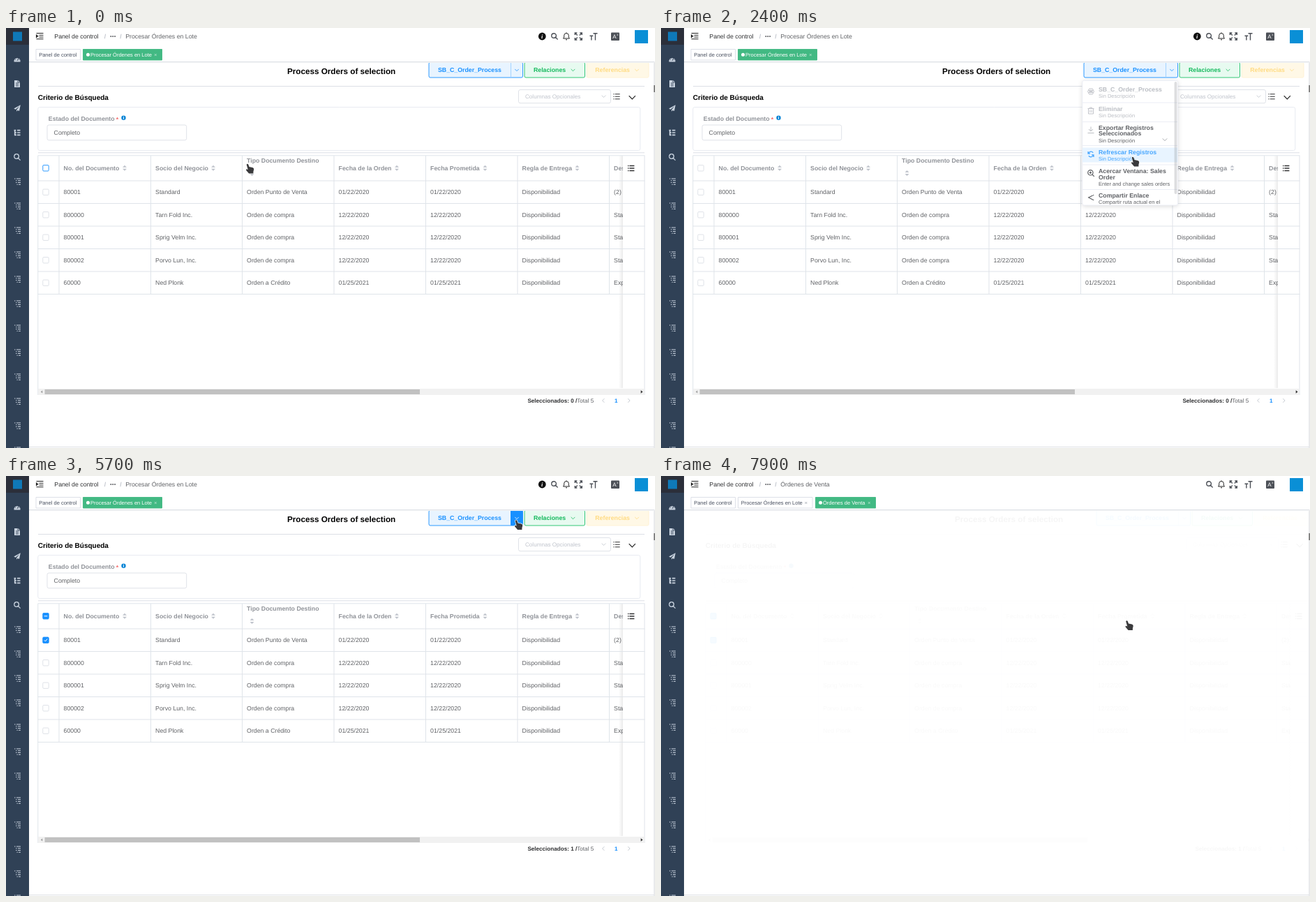
An HTML page with a canvas that plays this animation: 930 by 602 pixels, repeating every 8 s.

```html
<!DOCTYPE html>
<html lang="es">
<head>
<meta charset="utf-8">
<title>Procesar Órdenes en Lote</title>
<style>
html, body { margin: 0; width: 100%; height: 100%; overflow: hidden; background: #fff; }
canvas { display: block; }
</style>
</head>
<body>
<canvas id="stage" width="930" height="602"></canvas>
<script>
const ctx = document.getElementById('stage').getContext('2d');
const LOOP = 8000, STEP = 100;
const BLUE = '#1890ff', TEXT = '#606266', HEAD = '#909399', MUTED = '#c0c4cc', LINE = '#dfe4ea', DARK = '#303133';
const ARROW = 0, HAND = 1;

// time, x, y, pointer shape
const PATH = [
  [0, 343.5, 194.5, HAND], [300, 343.5, 194.5, HAND], [400, 540, 170, ARROW], [500, 711, 147, ARROW],
  [700, 711, 147, ARROW], [1000, 729.5, 55.5, HAND], [2100, 729.5, 55.5, HAND], [2400, 673.5, 184.5, HAND],
  [2800, 673.5, 184.5, HAND], [3100, 540, 184, HAND], [3300, 411.5, 182, HAND], [3400, 411.5, 182, HAND],
  [3600, 132.5, 181.5, HAND], [3700, 132.5, 181.5, HAND], [4000, 48.5, 236, HAND], [4800, 48.5, 236, HAND],
  [4900, 84, 221, ARROW], [5000, 84, 221, ARROW], [5200, 657, 111, ARROW], [5300, 657, 111, ARROW],
  [5500, 728.5, 63, HAND], [6200, 728.5, 63, HAND], [6400, 693, 165.5, ARROW], [6500, 688, 176, HAND],
  [6900, 665, 207, HAND], [LOOP, 665, 207, HAND]
];
const COLS = [76, 207.5, 338.5, 470, 601.5, 733, 864.5];
const ROW_TOP = 219, ROW_H = 32.5;
const ROWS = [
  ['80001', 'Standard', 'Orden Punto de Venta', '01/22/2020', '01/22/2020', 'Disponibilidad', '(2)'],
  ['800000', 'Tarn Fold Inc.', 'Orden de compra', '12/22/2020', '12/22/2020', 'Disponibilidad', 'Standard'],
  ['800001', 'Sprig Velm Inc.', 'Orden de compra', '12/22/2020', '12/22/2020', 'Disponibilidad', 'Standard'],
  ['800002', 'Porvo Lun, Inc.', 'Orden de compra', '12/22/2020', '12/22/2020', 'Disponibilidad', 'Standard'],
  ['60000', 'Ned Plonk', 'Orden a Crédito', '01/25/2021', '01/25/2021', 'Disponibilidad', 'Export']
];
// label, sort icon x
const HEADS = [['No. del Documento', 170], ['Socio del Negocio', 297], ['Tipo Documento Destino', 352.5],
  ['Fecha de la Orden', 560], ['Fecha Prometida', 686.5], ['Regla de Entrega', 818.5], ['Descripción', 960]];
const ICONS = {
  gear: 'M-4.5 0L-2.3-4H2.3L4.5 0L2.3 4H-2.3ZM-2 0A2 2 0 1 0 2 0A2 2 0 1 0-2 0M-3.4-2L3.4 2M-3.4 2L3.4-2',
  trash: 'M-4.5-3H4.5M-1.5-3V-4.5H1.5V-3M-3.5-3V4.5H3.5V-3M-1.2-1V2.5M1.2-1V2.5',
  download: 'M0-4.5V2M-3-1L0 2L3-1M-4.5 4.5H4.5',
  refresh: 'M-3.8-.5A3.9 3.9 0 0 1 3.2-2.2M3.8.5A3.9 3.9 0 0 1-3.2 2.2M-4-4V-.8H-1M4 4V.8H1',
  zoom: 'M-4.3-.7A3.7 3.7 0 1 0 3.1-.7A3.7 3.7 0 1 0-4.3-.7M2 2L4.8 4.8M-2.4-.7H1.2M-.6-2.5V1.1',
  share: 'M3.5-3.5L-3.2 0L3.5 3.5M2.7-3.5H4.3M2.7 3.5H4.3M-4-.1H-2.5',
  search: 'M-4.2-1A3.3 3.3 0 1 0 2.4-1A3.3 3.3 0 1 0-4.2-1M1.6 1.6L4.6 4.6',
  bell: 'M-4.5 3H4.5L3.3 1.2V-1.2A3.3 3.3 0 0 0-3.3-1.2V1.2ZM-1 4.8H1M0-4.5V-5.5',
  expand: 'M-5-2V-5H-2M2-5H5V-2M5 2V5H2M-2 5H-5V2M-5-5L-1.5-1.5M5-5L1.5-1.5M5 5L1.5 1.5M-5 5L-1.5 1.5',
  indent: 'M-5-4H5M-1-1.2H5M-1 1.5H5M-5 4.3H5M-5-1.5L-2.8.2L-5 1.8Z',
  list: 'M-2.3-3.5H4.7M-2.3 0H4.7M-2.3 3.5H4.7M-4.7-3.5H-3.4M-4.7 0H-3.4M-4.7 3.5H-3.4',
  tree: 'M-4.5-4H-3M-1.5-4H4.5M-2.5-1.2H-1M.5-1.2H4.5M-2.5 1.5H-1M.5 1.5H4.5M-1 4.2H.4M1.5 4.2H4.5',
  nested: 'M-4.5-3.3H-1.7M-3.3-3V3.3H-1M-3.3 0H-1M0-3.3H4.5M0 0H4.5M0 3.3H4.5'
};
const MENU = [
  { icon: 'gear', y: 79, end: 107, titles: ['SB_C_Order_Process'], at: 88, iy: 91, note: 'Sin Descripción' },
  { icon: 'trash', y: 107, end: 134.5, titles: ['Eliminar'], at: 116, iy: 118.5, note: 'Sin Descripción', off: true },
  { icon: 'download', y: 134.5, end: 168.5, titles: ['Exportar Registros', 'Seleccionados'], at: 142.5, iy: 146, note: 'Sin Descripción', sub: true },
  { icon: 'refresh', y: 168.5, end: 196, titles: ['Refrescar Registros'], at: 177.5, iy: 181, note: 'Sin Descripción' },
  { icon: 'zoom', y: 196, end: 231.5, titles: ['Acercar Ventana: Sales', 'Order'], at: 205, iy: 208, note: 'Enter and change sales orders' },
  { icon: 'share', y: 231.5, end: 262, titles: ['Compartir Enlace'], at: 240, iy: 243, note: 'Compartir ruta actual en el' }
];

function text(s, x, cy, color, size = 8.75, bold = false, align = 'left') {
  ctx.font = `${bold ? 'bold ' : ''}${size}px "Liberation Sans", Arial, sans-serif`;
  ctx.fillStyle = color;
  ctx.textAlign = align;
  ctx.fillText(s, x, cy + size * 0.36);
}
function rect(x, y, w, h, color) {
  ctx.fillStyle = color;
  ctx.fillRect(x, y, w, h);
}
function box(x, y, w, h, r, fill, stroke) {
  ctx.beginPath();
  ctx.roundRect(x, y, w, h, r);
  if (fill) { ctx.fillStyle = fill; ctx.fill(); }
  if (stroke) { ctx.strokeStyle = stroke; ctx.lineWidth = 0.9; ctx.stroke(); }
}
function dot(x, y, r, color) {
  ctx.beginPath();
  ctx.arc(x, y, r, 0, 7);
  ctx.fillStyle = color;
  ctx.fill();
}
function shape(d, x, y, { fill, stroke, width = 1 }) {
  const p = new Path2D(d);
  ctx.save();
  ctx.translate(x, y);
  ctx.lineWidth = width;
  if (stroke) { ctx.strokeStyle = stroke; ctx.stroke(p); }
  if (fill) { ctx.fillStyle = fill; ctx.fill(p); }
  ctx.restore();
}
const icon = (name, x, y, color, width = 1) => shape(ICONS[name], x, y, { stroke: color, width });
const hline = (x, y, x2, color = LINE) => rect(x, y - 0.5, x2 - x, 1, color);
const vline = (x, y, y2, color = LINE) => rect(x - 0.5, y, 1, y2 - y, color);
const chevron = (x, y, r, color, width = 0.8) =>
  shape(`M${-r} ${-r / 2}L0 ${r / 2}L${r} ${-r / 2}`, x, y, { stroke: color, width });
const within = (p, x, y, x2, y2) => p.x >= x && p.x < x2 && p.y >= y && p.y < y2;

function pointerAt(t) {
  const i = PATH.findIndex(k => k[0] > t);
  const [t0, x0, y0, kind] = PATH[i - 1], [t1, x1, y1] = PATH[i];
  const f = (t - t0) / (t1 - t0);
  const left = x0 + (x1 - x0) * f, top = y0 + (y1 - y0) * f;
  return { left, top, kind, x: left + (kind === HAND ? 3 : 0), y: top + 1 };
}
// zoom-in-top: quintic ease out over 300 ms
const zoom = dt => dt < 0 ? 0 : 1 - (1 - Math.min(1, dt / 300)) ** 5;
function menuScale(t) {
  if (t < 4800) return zoom(t - 1568);
  if (t < 4900) return 0.35;
  return t < 7500 ? zoom(t - 6068) : 0;
}

function sidebar() {
  rect(0, 0, 33, 602, '#304156');
  rect(0, 0, 33, 24, '#2b2f3a');
  rect(10, 5.5, 13, 13, '#0f79b8');
  const c = '#c9d3df', x = 16;
  shape('M-4.5 3.5A4.6 4.6 0 1 1 4.5 3.5Z', x, 45, { fill: c });
  shape('M0 2L1.8-2M-3 .6H-2M2 .6H3M-2-2L-1.4-1.4', x, 45, { stroke: '#304156', width: 0.9 });
  shape('M-4-5H1.5L4-2.3V5H-4Z', x, 80, { fill: c });
  shape('M-2-1H2M-2 1H2M-2 3H2M1-5V-2H4', x, 80, { stroke: '#304156', width: 0.8 });
  shape('M4.8-4.8L-4.8.6L-2.3 1.8L3.2-3L-.9 2.4L-1 4.8L.6 3L3 4Z', x, 115, { fill: c });
  icon('nested', x, 150, c, 1.7);
  icon('search', x, 185, c, 1.3);
  for (let y = 220; y < 610; y += 35) icon('tree', x + 0.5, y, c, 1.1);
}

function tag(x, w, label, active, closable) {
  box(x + 0.5, 30.5, w - 1, 15.5, 0, active ? '#42b983' : '#fff', active ? '#42b983' : '#d8dce5');
  const color = active ? '#fff' : '#495060';
  if (active) dot(x + 7.5, 38.3, 2.5, '#fff');
  text(label, x + (active ? 11 : 4.7), 38.5, color, 7.5);
  if (closable) shape('M-1.4-1.4L1.4 1.4M1.4-1.4L-1.4 1.4', x + w - 9.7, 38.5, { stroke: active ? '#d6f0e4' : '#9097a2', width: 0.7 });
}

function navbar(moved) {
  rect(33, 0, 897, 48.5, '#fff');
  hline(33, 48.5, 929, '#dde0e6');
  rect(33, 49, 896, 1, '#f4f5f6');
  icon('indent', 48.5, 11.5, '#222', 1.1);
  text('Panel de control', 69.3, 12, DARK);
  text('/', 142, 12, MUTED, 8.75, true, 'center');
  for (const x of [150.3, 153.2, 156.1]) dot(x, 12, 1.05, TEXT);
  text('/', 164.5, 12, MUTED, 8.75, true, 'center');
  text(moved ? 'Órdenes de Venta' : 'Procesar Órdenes en Lote', 171.2, 12, TEXT);
  if (!moved) {
    dot(768.3, 12, 5.4, '#111');
    ctx.font = 'italic bold 8.5px "Liberation Serif", serif';
    ctx.textAlign = 'center';
    ctx.fillStyle = '#fff';
    ctx.fillText('i', 768.2, 15);
  }
  const c = '#4d5158';
  icon('search', 786, 12, c, 1.4);
  icon('bell', 803, 12, '#222', 1);
  icon('expand', 820.3, 12, c, 1.4);
  shape('M-.5-4.3H5.5M2.5-4.3V5.5M-5.5-.8H-.7M-3.1-.8V5.5', 842, 12, { stroke: c, width: 1.4 });
  box(867, 6.5, 12, 11.5, 1, c);
  text('A', 871.8, 12.5, '#fff', 8, false, 'center');
  text('x', 876.3, 9.6, '#fff', 4.5, false, 'center');
  rect(901, 3, 19, 19, '#0a8fd6');

  tag(42.5, 64.5, 'Panel de control', false, false);
  if (moved) {
    tag(110, 107.5, 'Procesar Órdenes en Lote', false, true);
    tag(221, 87, 'Órdenes de Venta', true, true);
  } else tag(110, 114, 'Procesar Órdenes en Lote', true, true);
}

function buttons(s) {
  text('Process Orders of selection', 403, 61.3, '#000', 11.7, true);
  box(606, 49.2, 134.5, 21.8, 2, '#e8f4ff', BLUE);
  if (s.caretHot) rect(723.5, 49.2, 17, 21.8, BLUE);
  else if (s.caretFading) rect(723.5, 49.6, 16.6, 21, '#c9e4fd');
  vline(723.5, 50, 70.5, s.caretHot ? BLUE : '#a3d3ff');
  text('SB_C_Order_Process', 619, 60, BLUE, 8.75, true);
  chevron(732, 60.3, 2.7, s.caretHot ? '#fff' : BLUE);
  box(743, 49.2, 86.5, 21.8, 2, '#e7faf0', '#1dc068');
  text('Relaciones', 756, 60, '#13b95c', 8.75, true);
  chevron(812.5, 60.3, 2.8, '#13b95c');
  box(832, 49.2, 89, 21.8, 2, '#fff8e6', '#fff1d2');
  text('Referencias', 844.3, 60, '#ffdb82', 8.75, true);
  chevron(904, 60.3, 2.8, '#ffdb82');
}

function criteria() {
  hline(46, 83.5, 915, '#dcdfe6');
  text('Criterio de Búsqueda', 45.8, 99.2, '#000', 10, true);
  box(734.5, 88.5, 132, 19.2, 2.5, '#fff', '#dcdfe6');
  text('Columnas Opcionales', 744, 98.2, MUTED, 8.125);
  chevron(856.5, 98, 2.9, MUTED);
  icon('list', 875, 98.3, DARK, 1.1);
  chevron(897.3, 99.5, 4.6, '#222', 1.2);
  box(45.8, 113.5, 863, 62, 2.5, '#fff', '#e6e9f0');
  text('Estado del Documento', 60.8, 130, HEAD, 8.75, true);
  text('*', 157.8, 131, '#f56c6c', 8.75, true);
  dot(168.5, 128.7, 3.2, '#0d86d6');
  rect(168, 128, 1, 2.6, '#fff');
  rect(168, 126.6, 1, 0.9, '#fff');
  box(59, 139, 199.7, 21.8, 2.5, '#fff', '#dcdfe6');
  text('Completo', 68.6, 150, TEXT);
  hline(46, 178.8, 915, '#dcdfe6');
}

function checkbox(cy, state) {
  const on = state === 'on' || state === 'some';
  box(52.8, cy - 4.2, 8.4, 8.4, 1.2, on ? BLUE : '#fff', on || state === 'focus' ? BLUE : '#dcdfe6');
  if (state === 'on') shape('M-2.2 0L-.6 1.7L2.2-1.8', 57, cy, { stroke: '#fff', width: 1 });
  if (state === 'some') rect(54.6, cy - 0.5, 4.8, 1, '#fff');
}
function sorter(x, y) {
  shape('M-3-1L0-4L3-1ZM-3 1L0 4L3 1Z', x, y, { fill: MUTED });
}

function table(s) {
  const bottom = ROW_TOP + ROW_H * ROWS.length;
  if (s.row >= 0) rect(46, ROW_TOP + s.row * ROW_H, 869, ROW_H, '#f5f7fa');
  ctx.save();
  ctx.beginPath();
  ctx.rect(45, 182, 839, 336);
  ctx.clip();
  COLS.forEach((x, i) => {
    vline(x, 183, bottom);
    const tall = i === 2;
    text(HEADS[i][0], x + 6.6, tall ? 190 : 200.7, HEAD, 8.75, true);
    sorter(HEADS[i][1], tall ? 208 : 200.8);
    ROWS.forEach((r, j) => text(r[i], x + 6.6, ROW_TOP + (j + 0.5) * ROW_H, TEXT));
  });
  ctx.restore();
  checkbox(200.8, s.picked ? 'some' : s.headFocus ? 'focus' : '');
  ROWS.forEach((r, j) => checkbox(ROW_TOP + (j + 0.5) * ROW_H, j ? '' : s.picked ? 'on' : s.rowFocus ? 'focus' : ''));

  // fixed column with its shadow to the left
  const g = ctx.createLinearGradient(878, 0, 884, 0);
  g.addColorStop(0, 'rgba(0,0,0,0)');
  g.addColorStop(1, 'rgba(0,0,0,.08)');
  rect(878, 183, 6, 333, g);
  rect(884, 183, 31, 333, '#fff');
  if (s.row >= 0) rect(884, ROW_TOP + s.row * ROW_H, 31, ROW_H, '#f5f7fa');
  icon('list', 895.7, 201, DARK, 1.3);
  hline(45.5, 182.8, 915.5);
  for (let j = 0; j <= ROWS.length; j++) hline(45.5, ROW_TOP + j * ROW_H, 915.5);
  vline(45.8, 183, 526);
  vline(915, 183, 526);

  rect(46, 517, 869, 9, '#f1f1f1');
  rect(55.5, 518, 537.5, 7, '#c1c1c1');
  shape('M1.3-2L-1.3 0L1.3 2Z', 51, 521.5, { fill: '#a0a0a0' });
  shape('M-1.3-2.2L1.5 0L-1.3 2.2Z', 911, 521.5, { fill: '#333' });
  text(`Seleccionados: ${s.picked ? 1 : 0} /`, 747.4, 534, DARK, 8.125, true);
  text('Total 5', 818.3, 534, TEXT, 8.125);
  shape('M1.4-2.8L-1.4 0L1.4 2.8', 856, 534, { stroke: MUTED, width: 0.9 });
  text('1', 874.2, 534, BLUE, 8.125, true, 'center');
  shape('M-1.4-2.8L1.4 0L-1.4 2.8', 892.7, 534, { stroke: MUTED, width: 0.9 });
}

function menu(s) {
  if (!s.menu) return;
  ctx.save();
  ctx.globalAlpha = s.menu;
  ctx.translate(0, 75 * (1 - s.menu));
  ctx.scale(1, s.menu);
  ctx.shadowColor = 'rgba(0,0,0,.16)';
  ctx.shadowBlur = 7;
  ctx.shadowOffsetY = 1.2;
  box(603.8, 75.3, 136.8, 178.7, 2.5, '#fff');
  ctx.shadowColor = 'transparent';
  box(603.8, 75.3, 136.8, 178.7, 2.5, null, '#ebeef5');
  ctx.beginPath();
  ctx.rect(604, 76, 136.5, 177.5);
  ctx.clip();
  const inside = within(s.pointer, 604, 76, 740, 254);
  MENU.forEach((m, i) => {
    const off = m.off || (i === 0 && !s.picked);
    const hot = inside && !off && s.pointer.y >= m.y && s.pointer.y < m.end;
    if (hot) rect(604, m.y + 3, 136.5, m.end - m.y - 6.5, '#e8f4ff');
    const color = off ? '#bbbec4' : hot && !m.sub ? '#46a6ff' : TEXT;
    icon(m.icon, 616, m.iy, hot ? '#46a6ff' : m.sub ? '#b4b7bd' : color, i > 2 ? 1.2 : 0.9);
    m.titles.forEach((s, k) => text(s, 627, m.at + k * 8.7, color, 8.75, true));
    text(m.note, 627, m.at + m.titles.length * 8.7 + 1, color, 7.5);
    if (m.sub) chevron(722, 160, 3.2, HEAD);
    hline(604, m.end, 740.5, '#ebeef5');
  });
  if (inside) box(735.6, 77, 3.8, 161, 1.9, 'rgba(144,147,153,.3)');
  ctx.restore();
}

function pointer(p) {
  const d = p.kind === HAND
    ? 'M1.2 1.3Q2.2-.6 3.7.9L5 4.4L9.8 5.5Q12 6 11.7 8.2L10.9 11.4V14H4.6L.9 9.8Q-.3 8.1 1.3 7.7L3.2 8.6Z'
    : 'M0 0V12.6L2.9 10L5.2 14.8L7.4 13.8L5.2 9.2H9.2Z';
  shape(d, p.left, p.top, { stroke: 'rgba(255,255,255,.9)', width: 1.4, fill: '#3a3a3c' });
}

function draw(t) {
  const p = pointerAt(t), scale = menuScale(t);
  const overMenu = scale > 0 && within(p, 604, 76, 740, 254);
  const leaving = Math.max(0, (t - 7600) / 100);
  const s = {
    pointer: p,
    menu: scale,
    picked: t >= 4800,
    headFocus: t < 1500,
    rowFocus: t >= 4600,
    caretHot: within(p, 723, 49, 742, 72),
    caretFading: t >= 6300 && t < 6500,
    row: !overMenu && within(p, 46, ROW_TOP, 915, 381) ? Math.floor((p.y - ROW_TOP) / ROW_H) : -1
  };
  ctx.globalAlpha = 1;
  rect(0, 0, 930, 602, '#fff');
  ctx.save();
  if (leaving) {
    ctx.globalAlpha = 0.55 * 0.27 ** (leaving - 1);
    ctx.translate(7 * leaving - 3, 0);
  }
  buttons(s);
  criteria();
  table(s);
  ctx.restore();
  rect(929, 0, 1, 602, '#fff');
  vline(929, 0, 602, '#d3d5d9');
  rect(928.3, 82, 1.7, 10, '#777');
  hline(33, 600.5, 929, '#dfe1e5');
  navbar(t >= 7500);
  sidebar();
  menu(s);
  pointer(p);
}

ctx.textRendering = 'geometricPrecision';
let shown = -1;
function tick() {
  const t = Math.floor(performance.now() % LOOP / STEP) * STEP;
  if (t !== shown) draw(shown = t);
  requestAnimationFrame(tick);
}
tick();
</script>
</body>
</html>
```
